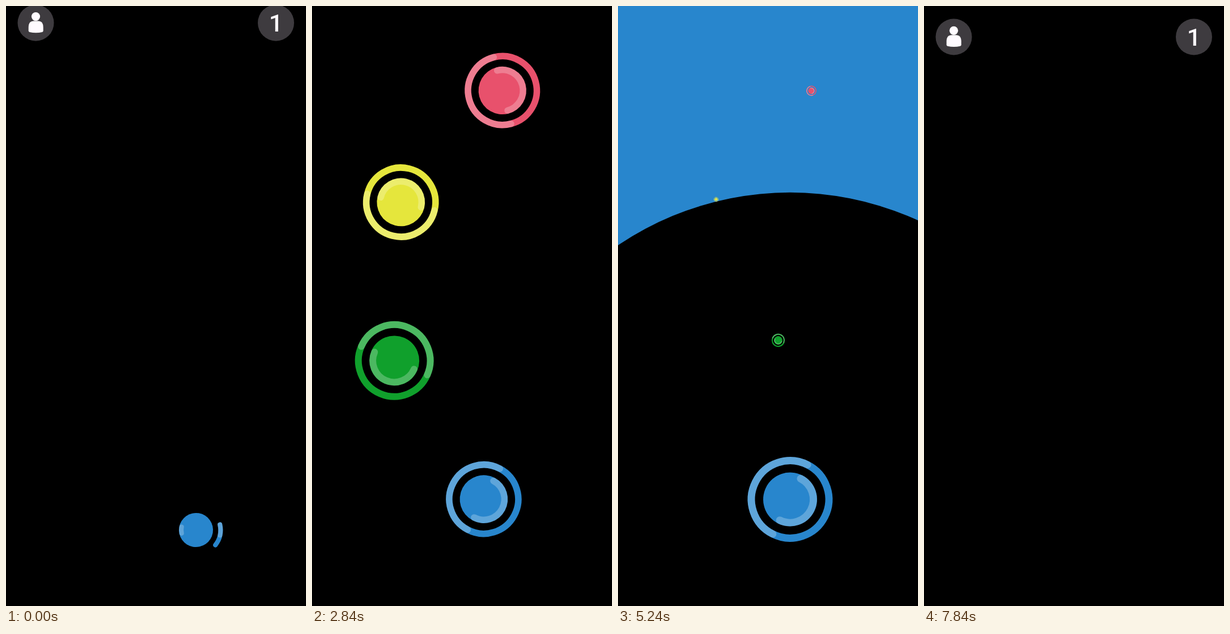
Animation, 529 px wide and 1058 px high, one loop 8.16 s. Source, as an HTML page with a canvas:

```html
<!DOCTYPE html>
<html lang="en">
<head>
<meta charset="utf-8">
<title>Finger picker</title>
<style>
  html, body { margin: 0; width: 529px; height: 1058px; overflow: hidden; background: #000; }
  canvas, svg { position: absolute; left: 0; top: 0; display: block; }
  text { font: 500 43px Roboto, Arial, sans-serif; text-anchor: middle; }
</style>
</head>
<body>
<canvas id="stage" width="529" height="1058"></canvas>
<svg width="529" height="1058" fill="#fffbff">
  <g id="badges">
    <circle cx="52.5" cy="0" r="32" fill="#3e3b3f"/>
    <circle cx="52.5" cy="-11.2" r="7.6"/>
    <path d="M39.7 8 Q39.7 -3.3 49 -3.3 H56.5 Q65.7 -3.3 65.7 8 V14 Q65.7 15.6 64 16.2 Q52.7 18.8 41.4 16.2 Q39.7 15.6 39.7 14 Z"/>
    <circle cx="476" cy="0" r="32" fill="#3e3b3f"/>
    <text x="476" y="15.3">1</text>
  </g>
</svg>
<script>
const LOOP = 8160, GROW = 700, PULSE = 1040, SPEED = .2995, REVEAL = 5080, RELEASE = 6740;
const BLUE = '#2886cd', SHINE = 'rgba(255,255,255,.25)';
const ctx = document.getElementById('stage').getContext('2d');
const badges = document.getElementById('badges');

// spin: angle at time 0; peak: time of a pulse maximum; path: resting places of the finger
const dots = [
  { color: '#e8516c', born: 1770, peak: 2260, spin: -55.5, gone: REVEAL, fade: 183, path: [
    { t: 2120, x: 335.5, y: 151.5 }, { t: 3560, x: 336, y: 146.5 }, { t: 4800, x: 341, y: 149.5 }] },
  { color: '#e5e63c', born: 1485, peak: 2230, spin: -117, gone: REVEAL, fade: 170, path: [
    { t: 2120, x: 158.5, y: 355.5 }, { t: 3560, x: 155, y: 336.5 }, { t: 4900, x: 173, y: 341 }] },
  { color: '#10a02c', born: 380, peak: 2120, spin: 72.5, gone: REVEAL, fade: 190, path: [
    { t: 2120, x: 143.5, y: 625.5 }, { t: 4200, x: 149.5, y: 625 }, { t: 4690, x: 282.5, y: 589.5 }] },
  { color: BLUE, born: -535, peak: 160, spin: -13, gone: RELEASE, fade: 190, path: [
    { t: 0, x: 335, y: 924 }, { t: 880, x: 300, y: 868 }, { t: 3560, x: 303.5, y: 870 }] }
];

const span = (t, from, length) => Math.min(1, Math.max(0, (t - from) / length));
const mix = (a, b, k) => a + (b - a) * k;
const easeOut = k => 1 - (1 - k) ** 3;
const smooth = k => k * k * (3 - 2 * k);

function place(path, t) {
  let { x, y } = path[0];
  for (let i = 1; i < path.length; i++) {
    const k = smooth(span(t, path[i - 1].t, path[i].t - path[i - 1].t));
    x = mix(x, path[i].x, k);
    y = mix(y, path[i].y, k);
  }
  return [x, y];
}

function disc(x, y, r, color) {
  ctx.fillStyle = color;
  ctx.beginPath();
  ctx.arc(x, y, r, 0, Math.PI * 2);
  ctx.fill();
}

// Strokes an arc around the current centre, starting on the rotated x axis.
function arc(r, turns, color) {
  ctx.strokeStyle = color;
  ctx.beginPath();
  ctx.arc(0, 0, r, 0, Math.PI * 2 * turns, turns < 0);
  ctx.stroke();
}

function drawDot(dot, t) {
  if (t < dot.born || t >= dot.gone + dot.fade) return;
  const p = span(t, dot.born, GROW);
  const pulse = 71 + 5 * Math.cos((t - dot.peak) / PULSE * Math.PI * 2);
  const grown = p + .125 * Math.sin(p * Math.PI * 2);
  const r = pulse * grown * (1 - span(t, dot.gone, dot.fade));
  const turns = p * p * (3.25 * p - 2.25); // winds back before closing
  ctx.save();
  ctx.translate(...place(dot.path, t));
  ctx.rotate((dot.spin + t * SPEED) * Math.PI / 180);
  ctx.lineCap = 'round';
  ctx.lineWidth = r * .173;
  disc(0, 0, r * .635, dot.color);
  arc(r * .914, turns, dot.color);
  arc(r * .914, turns / 2, SHINE);
  ctx.rotate(Math.PI);
  arc(r * .5485, turns / 2, SHINE);
  ctx.restore();
}

function holeRadius(t) {
  if (t < RELEASE) return mix(932, 135, easeOut(span(t, REVEAL, 800)));
  return mix(135, 932, span(t, RELEASE, 500) ** 2);
}

function badgeY(t) {
  if (t < REVEAL) return mix(30, -34, span(t, 0, 240));
  return mix(-34, 54.5, easeOut(span(t, 6900, 580)));
}

function draw(t) {
  ctx.fillStyle = t >= REVEAL && t < RELEASE + 500 ? BLUE : '#000';
  ctx.fillRect(0, 0, 529, 1058);
  disc(303.5, 870, holeRadius(t), '#000');
  dots.forEach(dot => drawDot(dot, t));
  badges.setAttribute('transform', `translate(0 ${badgeY(t)})`);
}

const begin = performance.now();
function tick() {
  draw((performance.now() - begin) % LOOP);
  requestAnimationFrame(tick);
}
tick();
</script>
</body>
</html>
```
